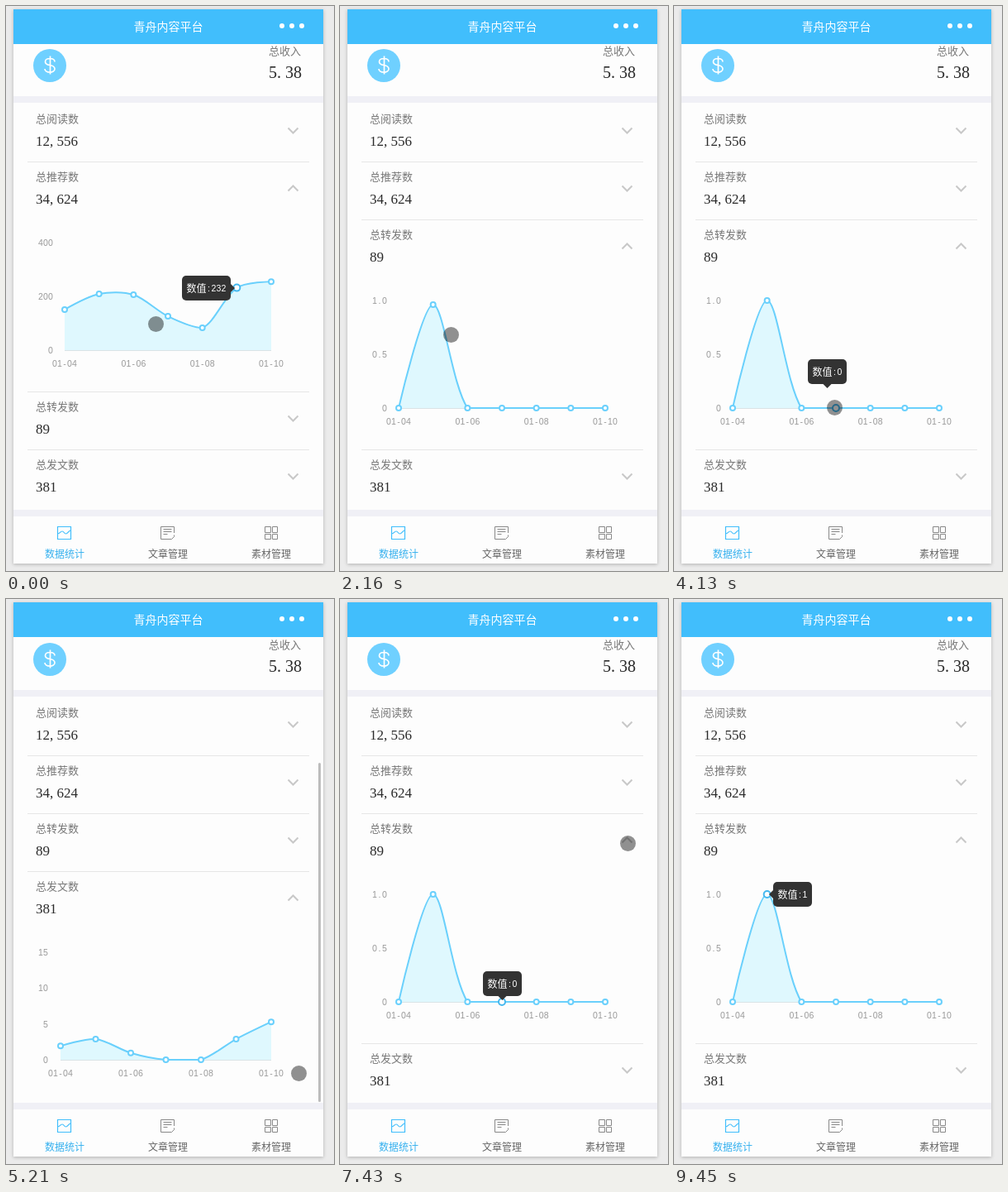
An HTML page for the animation above (9730 ms loop, 397x683 px).

```html
<!DOCTYPE html>
<html lang="zh-CN">
<head>
<meta charset="utf-8">
<title>数据统计</title>
<style>
  html, body { margin: 0; width: 100%; height: 100%; overflow: hidden; background: #ebebeb; }
  svg { display: block; font-family: "Noto Sans CJK SC", "Noto Sans CJK", sans-serif; }
  .phone { fill: #fdfdfd; filter: drop-shadow(0 1px 2px rgba(0, 0, 0, .25)); }
  .label { font-size: 13px; font-weight: 300; fill: #777; }
  .num { font-family: "Liberation Serif", serif; fill: #2a2a2a; }
  .small { font: 10.500px "Liberation Sans", sans-serif; text-anchor: middle; fill: #999; }
  .tip { font-size: 12px; fill: #fff; }
  .tab { font-size: 12px; font-weight: 300; text-anchor: middle; fill: #666; }
  .line { fill: none; stroke: #6ad0fc; stroke-width: 2; }
  .chev { fill: none; stroke: #c8c8c8; stroke-width: 2; }
  .icon { fill: none; stroke: #888; stroke-width: 1; }
</style>
</head>
<body>
<svg width="397" height="683" viewBox="0 0 397 683">
  <rect class="phone" x="9" y="4" width="375" height="670"/>
  <g id="content"></g>
  <rect x="9" y="4" width="375" height="42" fill="#41befc"/>
  <text x="196.500" y="30" font-size="14" font-weight="500" text-anchor="middle" fill="#fff">青舟内容平台</text>
  <g fill="#fff">
    <circle cx="334" cy="24" r="3"/><circle cx="346" cy="24" r="3"/><circle cx="358" cy="24" r="3"/>
  </g>
  <rect x="9" y="609" width="375" height="8" fill="#f0f0f6"/>
  <rect x="9" y="617" width="375" height="57" fill="#fdfdfd"/>
  <g class="icon">
    <path stroke="#41befc" stroke-width="1.200" d="M62.500 629.500h16v15h-16zM62.500 638c3 0 3-3 5.500-3s2 3 4.500 3 3-4 6-4"/>
    <path d="M203.500 637v-7.500h-16v15h13l3-3v-2M190.500 632.500h10M190.500 635.500h10M190.500 638.500h5"/>
    <path d="M313.500 629.500h7v7h-7zM322.500 629.500h6v7h-6zM313.500 638.500h7v6h-7zM322.500 638.500h6v6h-6z"/>
  </g>
  <text class="tab" x="71" y="667" style="fill:#35b0ee">数据统计</text>
  <text class="tab" x="196" y="667">文章管理</text>
  <text class="tab" x="321" y="667">素材管理</text>
  <g id="overlay"></g>
</svg>
<script>
const LOOP = 9730, ROW = 70, CHART = 208, SMOOTH = 0.3, CELL = 6;

// bursts of movement: first step, last step, number of steps
const bursts = [
  [120, 1110, 8], [1260, 2160, 8], [2310, 2700, 4], [3010, 3670, 6], [4130, 5090, 8],
  [5210, 6170, 8], [6320, 7280, 8], [7430, 7430, 1], [7730, 8700, 7], [8850, 9450, 5]
];
const steps = [0];
for (const [a, b, n] of bursts)
  for (let i = 0; i < n; i++) steps.push(a + (n > 1 ? i * (b - a) / (n - 1) : 0));

const rows = [
  { name: '总阅读数', total: '12,556' },
  { name: '总推荐数', total: '34,624', left: 71, tickX: 57, ticks: ['400', '200', '0'],
    data: [151, 209, 206, 126, 83, 232, 255] },
  { name: '总转发数', total: '89', left: 71, tickX: 57, ticks: ['1.0', '0.5', '0'],
    data: [0, 1, 0, 0, 0, 0, 0] },
  { name: '总发文数', total: '381', left: 66, tickX: 51, ticks: ['15', '10', '5', '0'],
    data: [4, 6, 2, 0, 0, 6, 11] }
];

// open row over time, with the start of its growth
const opened = [
  { at: 0, row: 1, grow: -2000 }, { at: 1500, row: 2, grow: 1500 },
  { at: 4950, row: 3, grow: 5014 }, { at: 7430, row: 2, grow: 0 }
];

const tips = [
  { from: 0, to: 500, i: 5, side: 'left' },
  { from: 3010, to: 4130, i: 1, side: 'right' },
  { from: 4130, to: 4950, i: 3, side: 'top', glide: { i: 1, side: 'right', at: 3965 } },
  { from: 6320, to: 6800, i: 6, side: 'left' },
  { from: 7430, to: 8100, i: 3, side: 'top' },
  { from: 8850, to: LOOP, i: 1, side: 'right' }
];

const path = [
  [0, 181, 384], [1110, 334, 484], [1380, 346, 494], [1600, 346, 494], [2160, 134, 397],
  [2700, 114, 354], [3010, 113, 352], [3670, 194, 485], [4200, 194, 485], [4810, 354, 573],
  [5400, 354, 573], [6050, 318, 460], [6650, 318, 460], [7280, 348, 295], [7800, 348, 295],
  [8500, 108, 368], [8700, 113, 358], [8850, 113, 358], [9150, 278, 620], [9300, 357, 674]
];
const bars = [[4800, 5600], [7730, 8400]];

const clamp = (v, a, b) => Math.min(b, Math.max(a, v));
const mix = (a, b, k) => a + (b - a) * k;
const easeOut = p => 1 - (1 - clamp(p, 0, 1)) ** 3;
const easeBoth = p => p * p * (3 - 2 * p);

// half-width characters on an even grid
function grid(s, x, y, cell, attrs) {
  const xs = [...s].map((c, i) => x + i * cell).join(' ');
  return `<text ${attrs} x="${xs}" y="${y}">${s}</text>`;
}
const number = (s, x, y, size) => grid(s, x, y, size / 2, `class="num" font-size="${size}"`);
const small = (s, x, y, color = '#999') =>
  grid(s, x + CELL / 2, y, CELL, `class="small" style="fill:${color}"`);

function chevron(y, up) {
  const d = up ? -3 : 3;
  return `<path class="chev" d="M341.500 ${y - d}l6 ${2 * d}l6 ${-2 * d}"/>`;
}

function points(row, top, grown) {
  const gap = (321 - row.left) / 6;
  return row.data.map((v, i) => [row.left + i * gap, top + 228 - v / row.ticks[0] * 130 * grown]);
}

// smooth curve whose handles stay inside the bounds of the points
function curve(pts) {
  const ys = pts.map(p => p[1]), lo = Math.min(...ys), hi = Math.max(...ys);
  const dist = (a, b) => Math.hypot(a[0] - b[0], a[1] - b[1]);
  const handles = pts.map((p, i) => {
    const a = pts[i - 1], b = pts[i + 1];
    if (!a || !b) return [p, p];
    const da = dist(p, a), db = dist(p, b);
    return [-da, db].map(d => {
      const k = SMOOTH * d / (da + db);
      return [p[0] + (b[0] - a[0]) * k, clamp(p[1] + (b[1] - a[1]) * k, lo, hi)];
    });
  });
  let d = 'M' + pts[0];
  for (let i = 1; i < pts.length; i++) d += `C${handles[i - 1][1]} ${handles[i][0]} ${pts[i]}`;
  return d;
}

function drawChart(row, top, pts, hot) {
  const base = top + 228, d = curve(pts), last = row.ticks.length - 1;
  let out = `<path fill="#dff8fe" d="${d}V${base}H${row.left}Z"/>
    <path stroke="#d9e3e6" d="M${row.left} ${base + .5}H321"/><path class="line" d="${d}"/>`;
  row.ticks.forEach((v, i) => {
    out += small(v, row.tickX - v.length * CELL, base - 130 * (1 - i / last) + 4);
  });
  pts.forEach(([x, y], i) => {
    const on = i === hot;
    out += `<circle cx="${x}" cy="${y}" r="${on ? 4 : 3}" fill="#fff" stroke="${on ? '#45b8ee' : '#6ad0fc'}" stroke-width="2"/>`;
    if (i % 2 === 0) out += small('01-' + String(4 + i).padStart(2, '0'), x - 2.5 * CELL, top + 248);
  });
  return out;
}

function tipBox([x, y], side, w) {
  if (side === 'left') return [x - 7 - w, y - 15];
  if (side === 'right') return [x + 7, y - 15];
  return [x - w / 2, y - 37];
}

function drawTip(tip, row, pts, t) {
  const value = ':' + row.data[tip.i], w = 35 + value.length * CELL;
  let [x, y] = tipBox(pts[tip.i], tip.side, w);
  if (tip.glide) {
    const g = tip.glide, [gx, gy] = tipBox(pts[g.i], g.side, w), k = easeOut((t - g.at) / 400);
    x = mix(gx, x, k);
    y = mix(gy, y, k);
  }
  x = Math.round(x);
  y = Math.round(y);
  const arrow = {
    left: `M${x + w} ${y + 10}l5 5l-5 5z`,
    right: `M${x} ${y + 10}l-5 5l5 5z`,
    top: `M${x + w / 2 - 5} ${y + 30}l5 5l5 -5z`
  }[tip.side];
  return `<g fill="#333"><rect x="${x}" y="${y}" width="${w}" height="30" rx="5"/><path d="${arrow}"/></g>
    <text class="tip" x="${x + 5.5}" y="${y + 19.5}">数值</text>`
    + small(value, x + 29.5, y + 19, '#fff');
}

function drawContent(t) {
  const open = opened.filter(o => o.at <= t).pop();
  const tip = tips.find(p => p.from <= t && t < p.to);
  const shift = t >= 4950 ? 1 : 0;
  let top = 118 + shift;
  let out = `<g transform="translate(0 ${shift})">
    <circle cx="53" cy="72" r="20" fill="#6fd0ff"/>
    <path fill="none" stroke="#fff" stroke-width="1.700" d="M59 67.500c0-3-3-4-6-4s-5.500 1.500-5.500 4 2.500 3.500 5.500 4 6 2 6 4.500-3 4-6 4-6-1.500-6-4M53.500 60.500v22"/>
    <text class="label" x="357" y="59" text-anchor="end">总收入</text>
    ${number('5.38', 318, 87, 20)}
    <rect x="9" y="109" width="375" height="8" fill="#f0f0f6"/></g>`;
  rows.forEach((row, i) => {
    const isOpen = i === open.row;
    if (i) out += `<rect x="26" y="${top}" width="341" height="1" fill="#e6e6e6"/>`;
    out += `<text class="label" x="36" y="${top + 23}">${row.name}</text>`
      + number(row.total, 36, top + 51, 17) + chevron(top + 32.5, isOpen);
    if (isOpen) {
      const pts = points(row, top, easeOut((t - open.grow) / 1000));
      out += drawChart(row, top, pts, tip ? tip.i : -1);
      if (tip) out += drawTip(tip, row, pts, t);
    }
    top += ROW + (isOpen ? CHART : 0);
  });
  return out;
}

function drawOverlay(t) {
  let out = '';
  if (bars.some(([a, b]) => a <= t && t < b))
    out += '<rect x="378" y="198" width="3" height="410" rx="1.500" fill="#bdbdbd"/>';
  if (t < 9450) {
    const n = path.findIndex(k => k[0] > t);
    let [, x, y] = path[path.length - 1];
    if (n > 0) {
      const a = path[n - 1], b = path[n], k = easeBoth((t - a[0]) / (b[0] - a[0]));
      x = mix(a[1], b[1], k);
      y = mix(a[2], b[2], k);
    }
    out += `<circle cx="${x + .5}" cy="${y + .5}" r="9.500" fill="#000" fill-opacity=".43"/>`;
  }
  return out;
}

const content = document.getElementById('content');
const overlay = document.getElementById('overlay');
const begin = performance.now();
let shown = -1;

function tick() {
  const now = (performance.now() - begin) % LOOP;
  const t = steps.filter(s => s <= now).pop();
  if (t !== shown) {
    shown = t;
    content.innerHTML = drawContent(t);
    overlay.innerHTML = drawOverlay(t);
  }
  requestAnimationFrame(tick);
}
tick();
</script>
</body>
</html>
```
